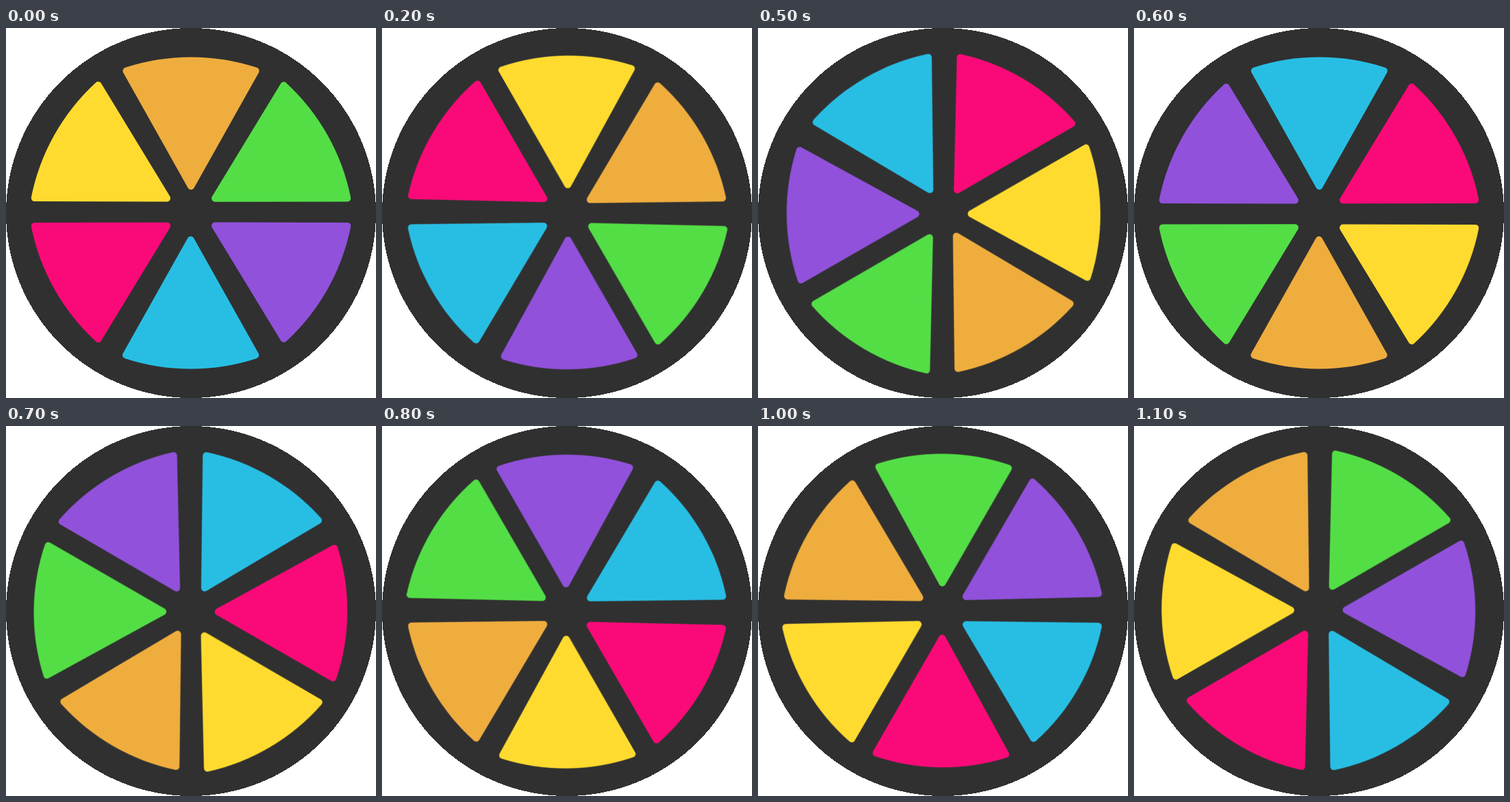
Animation of 540x540 px, one loop 1.2 s. Source, as an HTML page:

```html
<!DOCTYPE html>
<html lang="en">
<head>
<meta charset="utf-8">
<title>Colour wheel</title>
<style>
  html, body { margin: 0; width: 100%; height: 100%; overflow: hidden; background: #fff; }
  svg { display: block; width: 540px; height: 540px; }
  #wheel { transform-origin: 270px 270px; }
  #wheel path { stroke-width: 10; stroke-linejoin: round; }
</style>
</head>
<body>
<svg viewBox="0 0 540 540">
  <circle cx="270" cy="270" r="270" fill="#303030" shape-rendering="crispEdges"/>
  <g id="wheel"></g>
</svg>
<script>
  const LOOP = 1200, STEPS = 12;
  const wheel = document.getElementById('wheel');

  // Wedge pointing right from its tip; the stroke rounds the corners.
  const WEDGE = 'M0 0L168.5 -94.6A305 305 0 0 1 168.5 94.6Z';

  // colour, tip x, tip y, direction in degrees
  const wedges = [
    ['#efad3e', 270, 231, -90],
    ['#53de46', 305, 248.7, -29.4],
    ['#9151db', 305, 288.6, 29.4],
    ['#28bee4', 269.6, 309, 90],
    ['#fa0a78', 235, 288.8, 150.6],
    ['#ffdb30', 235, 248.4, -150.6]
  ];

  for (const [color, x, y, angle] of wedges) {
    const path = document.createElementNS('http://www.w3.org/2000/svg', 'path');
    path.setAttribute('d', WEDGE);
    path.setAttribute('fill', color);
    path.setAttribute('stroke', color);
    path.setAttribute('transform', `translate(${x} ${y}) rotate(${angle})`);
    wheel.append(path);
  }

  wheel.animate(
    { transform: ['rotate(0deg)', 'rotate(360deg)'] },
    { duration: LOOP, iterations: Infinity, easing: `steps(${STEPS}, end)` }
  );
</script>
</body>
</html>
```
